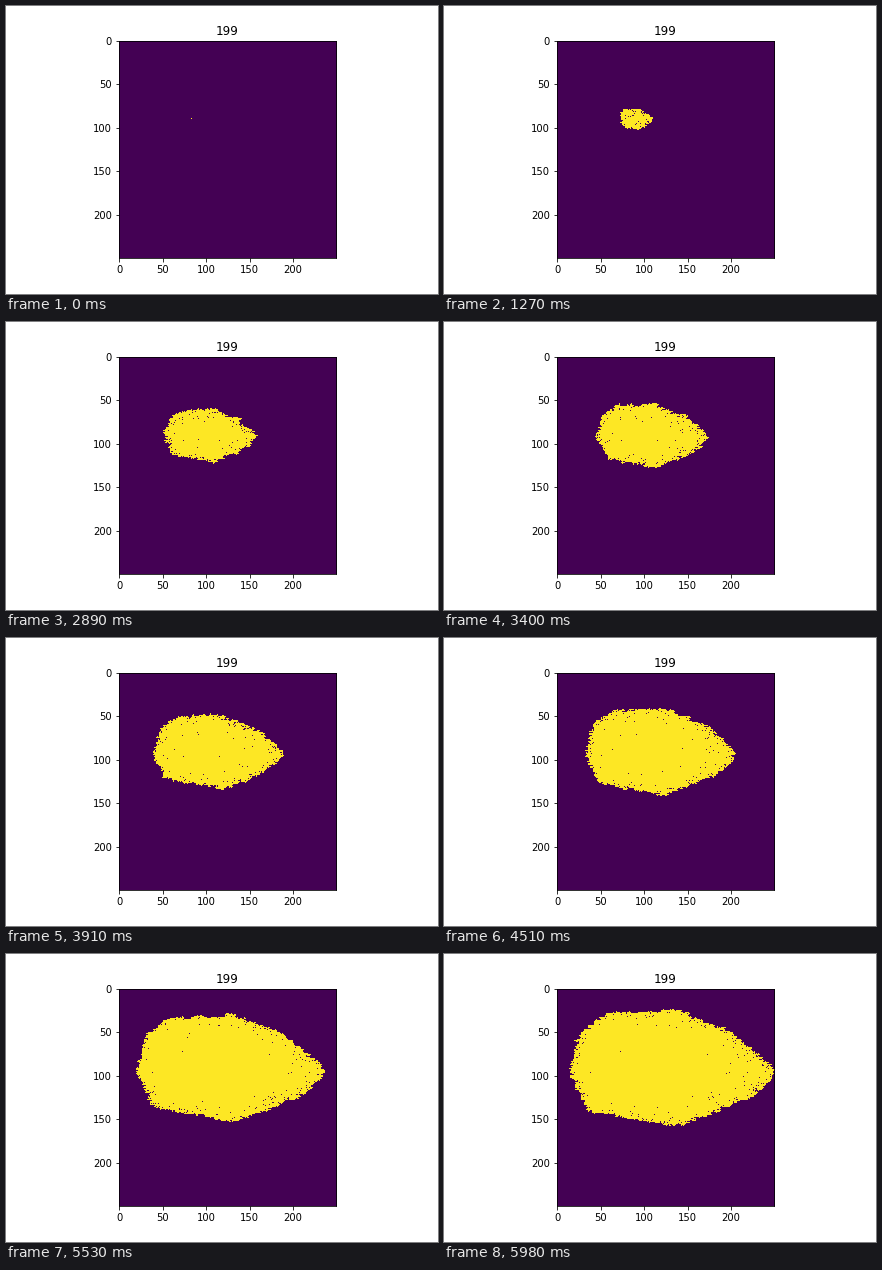
Animation of 432x288 px, one loop 6.01 s. Source, as a matplotlib script:

```python
import numpy as np
import matplotlib.pyplot as plt
from matplotlib.animation import FuncAnimation

SIZE = 250
FRAMES = 200
LOOP_MS = 6010
HOLD = 5                    # frames before the growth starts
STEPS = FRAMES - HOLD
SEED_X, SEED_Y = 83, 90
LEAD = 3                    # head start of the front, in steps
STREAK = 7                  # length of the streaks along a row, in cells

# Corners the front reaches at the end, relative to the first cell
CORNERS = np.array([(-70, 6), (-58, -41), (-26, -63), (55, -67), (120, -41),
                    (176, 8), (142, 35), (57, 70), (-48, 52)])

# Chance per step to spread to the neighbour at (dx, dy)
SPREAD = {(1, 0): 1.0, (-1, 0): 0.5, (0, 1): 0.5, (0, -1): 0.5}


def cross(a, b):
    return a[0] * b[1] - a[1] * b[0]


def front_time():
    """Step at which a polygon growing at constant speed meets each cell."""
    y, x = np.mgrid[:SIZE, :SIZE]
    cell = (x - SEED_X, y - SEED_Y)
    edges = np.roll(CORNERS, -1, axis=0) - CORNERS
    scale = [cross(cell, e) / cross(c, e) for c, e in zip(CORNERS, edges)]
    return STEPS * np.max(scale, axis=0)


def random_delay(rng):
    """Streaky noise along the rows, plus a few cells that lag far behind."""
    shape = (SIZE, SIZE)
    raw = rng.normal(size=shape)
    streaks = sum(np.roll(raw, k, axis=1) for k in range(STREAK))
    lag = np.where(rng.random(shape) < 0.06, 20, 4)
    return 5 * streaks / np.sqrt(STREAK) + lag * rng.exponential(size=shape)


def shifted(grid, dx, dy):
    padded = np.pad(grid, 1)
    return padded[1 - dy:1 - dy + SIZE, 1 - dx:1 - dx + SIZE]


def grow():
    rng = np.random.default_rng(7)
    opens = front_time() + random_delay(rng) - LEAD
    grid = np.zeros((SIZE, SIZE), bool)
    grid[SEED_Y, SEED_X] = True
    states = [grid]
    for step in range(1, STEPS):
        lit = np.zeros_like(grid)
        for (dx, dy), chance in SPREAD.items():
            lit |= shifted(grid, dx, dy) & (rng.random(grid.shape) < chance)
        grid = grid | (lit & (opens < step))
        states.append(grid)
    return states


states = grow()

fig, ax = plt.subplots(figsize=(6, 4), dpi=72)
fig.subplots_adjust(left=0.125, right=0.9, bottom=0.125, top=0.88)
image = ax.imshow(states[0].astype(float), cmap="viridis", vmin=0, vmax=1,
                  interpolation="nearest")
ax.set_title("199")


def update(frame):
    image.set_data(states[max(frame - HOLD, 0)].astype(float))
    return [image]


anim = FuncAnimation(fig, update, frames=FRAMES, interval=LOOP_MS / FRAMES,
                     repeat=True, repeat_delay=0)
plt.show()
```
